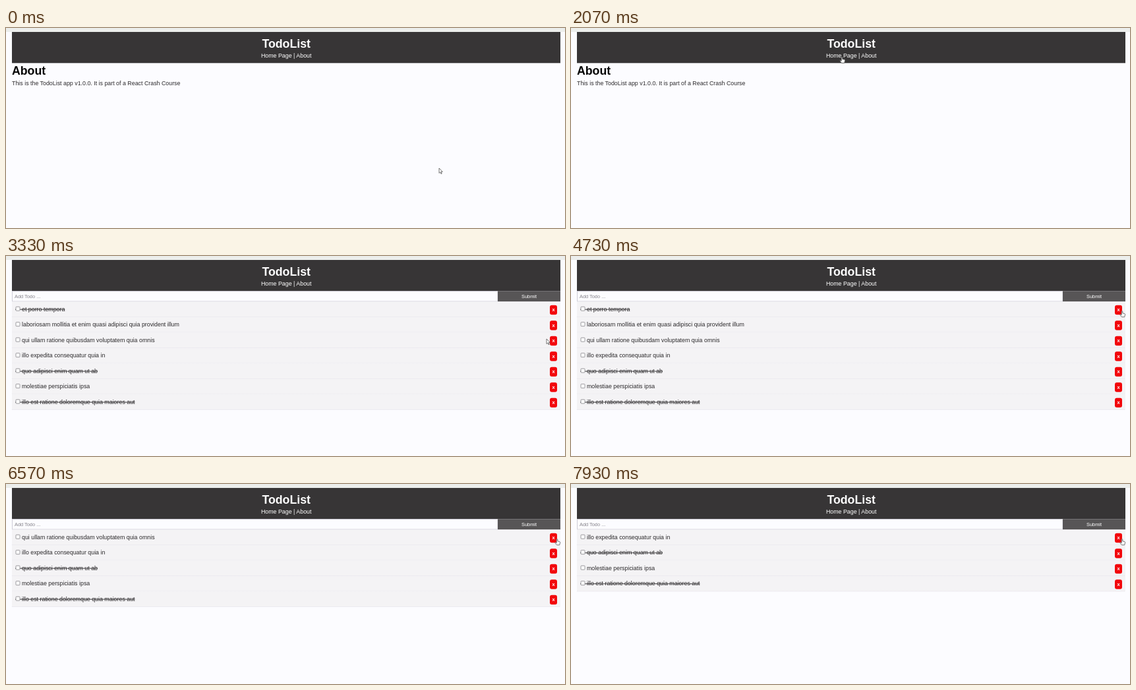
Write an HTML page that moves like this. It is 848 px wide and 304 px high and loops after 8 s.

```html
<!DOCTYPE html>
<html lang="en">
<head>
<meta charset="utf-8">
<title>TodoList</title>
<style>
  html, body { margin: 0; width: 100%; height: 100%; overflow: hidden; background: #fcfcff; }
  svg { display: block; width: 848px; height: 304px; font: 8.85px "Liberation Sans", Arial, sans-serif; fill: #2c2a2c; }
  .big { font-size: 17.72px; font-weight: bold; }
  .small { font-size: 7.4px; }
  .mid { text-anchor: middle; }
  .light { fill: #fff; }
</style>
</head>
<body>
<svg viewBox="0 0 848 304">
  <rect width="848" height="304" fill="#fcfcff"/>
  <rect width="848" height="6" fill="#eceeec"/>
  <rect x="9" y="6" width="832" height="47.3" fill="#373536"/>
  <text class="big mid light" x="425.2" y="30">TodoList</text>
  <text class="mid light" x="425.2" y="45">Home Page | About</text>

  <g id="about">
    <text class="big" x="9" y="71.3" fill="#050505">About</text>
    <text x="9" y="86.6">This is the TodoList app v1.0.0. It is part of a React Crash Course</text>
  </g>

  <g id="home">
    <rect x="9.5" y="53.6" width="736.5" height="15.4" fill="#fcfcff" stroke="#cfcdd6"/>
    <text class="small" x="13" y="64" fill="#85838a">Add Todo ...</text>
    <rect x="746" y="53.3" width="95" height="16" fill="#575556"/>
    <text class="small mid light" x="793.5" y="64">Submit</text>
    <g id="list"></g>
  </g>

  <g id="cursor">
    <path id="arrow" d="M0 0V7.6L1.8 6L3 8.8L4.2 8.3L3 5.6H5.3Z" fill="#fff" stroke="#555" stroke-width=".8"/>
    <path id="hand" d="M-.8 .6Q0 -.5 .8 .6V3.4L3.9 4.1Q4.8 4.5 4.6 5.6L3.7 9.2H-.5L-3 6Q-3 4.9 -2 5.2L-.8 6.2Z" fill="#fff" stroke="#555" stroke-width=".8"/>
  </g>
</svg>
<script>
const LOOP = 8000, OPEN = 2250, ROW = 23.5, TOP = 69.4;
const FIRST_REMOVE = 5200, REMOVE_EVERY = 1000;   // the top row goes each time
const ITEMS = [
  ["et porro tempora", true],
  ["laboriosam mollitia et enim quasi adipisci quia provident illum"],
  ["qui ullam ratione quibusdam voluptatem quia omnis"],
  ["illo expedita consequatur quia in"],
  ["quo adipisci enim quam ut ab", true],
  ["molestiae perspiciatis ipsa"],
  ["illo est ratione doloremque quia maiores aut", true]
];
// time, x, y of the pointer tip
const PATH = [
  [0, 657, 213], [320, 657, 213], [700, 417, 89.5], [1100, 411, 44], [2500, 411, 44],
  [3330, 820, 126], [4000, 836, 83.5], [LOOP, 836, 83.5]
];

const $ = id => document.getElementById(id);

function add(parent, tag, attrs, text) {
  const el = document.createElementNS("http://www.w3.org/2000/svg", tag);
  for (const k in attrs) el.setAttribute(k, attrs[k]);
  if (text) el.textContent = text;
  parent.appendChild(el);
  return el;
}

const rows = ITEMS.map(([label, done]) => {
  const g = add($("list"), "g", {});
  add(g, "rect", { x: 9, width: 832, height: ROW, fill: "#f4f3f5" });
  add(g, "path", { d: `M9 ${ROW - .4}H841`, stroke: "#dddbe6", "stroke-width": .8, "stroke-dasharray": "1 1" });
  const text = add(g, "text", { x: 24, y: 14.6 }, label);
  if (done) {
    const end = 24 + text.getComputedTextLength();
    add(g, "path", { d: `M14 11.8H${end}`, stroke: "#2c2a2c", "stroke-width": .9 });
  }
  add(g, "rect", { x: 15, y: 7.8, width: 6, height: 6, rx: .8, fill: "#fff", stroke: "#858388", "stroke-width": .8 });
  add(g, "rect", { x: 825, y: 5.4, width: 11, height: 14.4, rx: 3, fill: "#f2080c" });
  add(g, "text", { class: "small mid light", x: 830.5, y: 14.9, "font-weight": "bold" }, "x");
  return g;
});

const show = (el, on) => el.setAttribute("visibility", on ? "inherit" : "hidden");
const ease = p => p * p * (3 - 2 * p);

function pointer(t) {
  const i = Math.max(1, PATH.findIndex(p => p[0] > t));
  const [t0, x0, y0] = PATH[i - 1], [t1, x1, y1] = PATH[i];
  const k = ease((t - t0) / (t1 - t0));
  return [x0 + (x1 - x0) * k, y0 + (y1 - y0) * k];
}

function draw(t) {
  const home = t >= OPEN;
  show($("about"), !home);
  show($("home"), home);
  const gone = Math.max(0, Math.floor((t - FIRST_REMOVE) / REMOVE_EVERY) + 1);
  rows.forEach((g, i) => {
    show(g, i >= gone);
    g.setAttribute("transform", `translate(0 ${TOP + ROW * (i - gone)})`);
  });
  const [x, y] = pointer(t);
  const onLink = y > 36 && y < 49 && x > 387 && x < 464;
  const onButton = home && x > 825;
  show($("hand"), onLink || onButton);
  show($("arrow"), !onLink && !onButton);
  $("cursor").setAttribute("transform", `translate(${x} ${y})`);
}

const start = performance.now();
function tick() {
  draw((performance.now() - start) % LOOP);
  requestAnimationFrame(tick);
}
tick();
</script>
</body>
</html>
```
